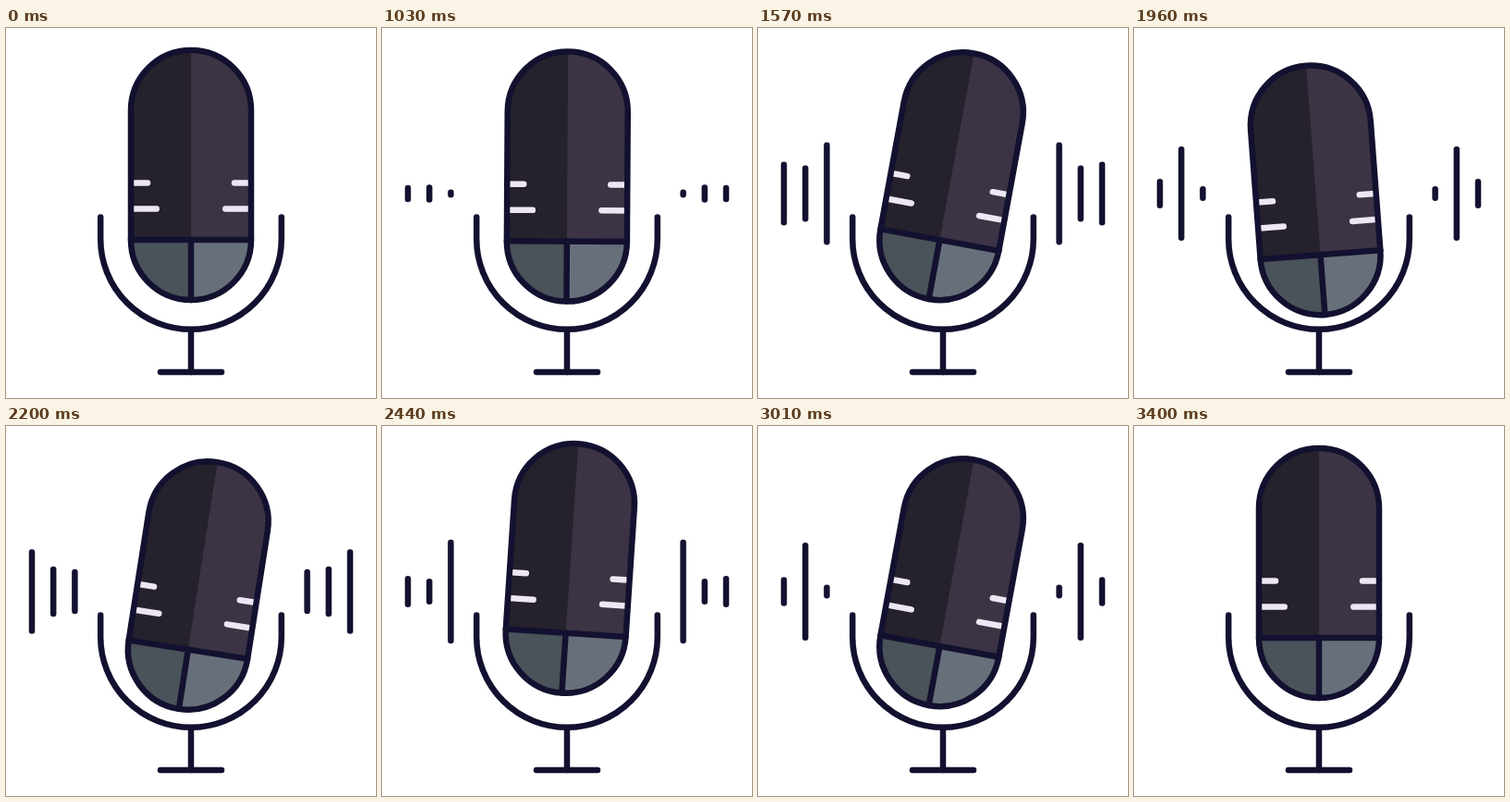
These frames come from a looping animation (400 px wide and 400 px high, 3430 ms). An HTML page with a canvas:

```html
<!DOCTYPE html>
<html lang="en">
<head>
<meta charset="utf-8">
<title>Microphone</title>
<style>
  html, body { margin: 0; width: 100%; height: 100%; overflow: hidden; background: #fff; }
  canvas { display: block; width: 400px; height: 400px; }
</style>
</head>
<body>
<canvas id="stage"></canvas>
<script>
const LOOP = 3430, HOLD = 1000, STEP = 30, STEPS = 80, RAMP = 5;
const INK = '#131130', MARK = '#ece7f2';
const PIVOT = { x: 200, y: 209 };
const RAD = Math.PI / 180;

// Turning points of the vertical bounce: [step, offset].
const BOUNCE = [[0, 0], [1, 1.6], [11, 19], [23.5, -7], [34.5, 19.4], [51.5, -8], [64.5, 10], [STEPS, 0]];

// Each wave swings around its mean; speed is in degrees per step.
const TILT = { mean: 2.8, swing: 7.7, speed: 15, peak: 18.5 };
const BARS = [
  { mean: 55, swing: 30, speed: 20.4, peak: 22.7 },
  { mean: 61, swing: 40, speed: 9.9, peak: 29 },
  { mean: 60, swing: 52, speed: 10.4, peak: 16 }
];

const canvas = document.getElementById('stage');
const ctx = canvas.getContext('2d');
const ratio = window.devicePixelRatio || 1;
canvas.width = canvas.height = 400 * ratio;

function wave({ mean, swing, speed, peak }, step) {
  const fade = Math.min(1, step / RAMP, (STEPS - step) / RAMP);
  return fade * (mean + swing * Math.cos(speed * (step - peak) * RAD));
}

function bounce(step) {
  const next = Math.max(1, BOUNCE.findIndex(([at]) => at >= step));
  const [a, from] = BOUNCE[next - 1], [b, to] = BOUNCE[next];
  const u = (step - a) / (b - a);
  return from + (to - from) * (1 - Math.cos(Math.PI * u)) / 2;
}

function line(x1, y1, x2, y2, color = INK) {
  ctx.strokeStyle = color;
  ctx.beginPath();
  ctx.moveTo(x1, y1);
  ctx.lineTo(x2, y2);
  ctx.stroke();
}

function fillRect(color, x, y, w, h) {
  ctx.fillStyle = color;
  ctx.fillRect(x, y, w, h);
}

function capsule() {
  ctx.beginPath();
  ctx.arc(200, 89, 65, Math.PI, 0);
  ctx.arc(200, 229, 65, 0, Math.PI);
  ctx.closePath();
}

function drawStand() {
  ctx.strokeStyle = INK;
  ctx.beginPath();
  ctx.moveTo(102.2, 204.5);
  ctx.lineTo(102.2, 228);
  ctx.arc(200, 228, 97.8, Math.PI, 0, true);
  ctx.lineTo(297.8, 204.5);
  ctx.stroke();
  line(200, 326, 200, 372);
  line(167, 372, 233, 372);
}

function drawMic(lift, tilt) {
  ctx.save();
  ctx.translate(PIVOT.x, PIVOT.y + lift);
  ctx.rotate(tilt * RAD);
  ctx.translate(-PIVOT.x, -PIVOT.y);

  ctx.save();
  capsule();
  ctx.clip();
  fillRect('#3c3445', 130, 20, 140, 210);
  fillRect('#25212d', 130, 20, 70, 210);
  fillRect('#67707a', 130, 229, 140, 70);
  fillRect('#4a525a', 130, 229, 70, 70);
  for (const [y, end] of [[167.5, 153], [195.5, 162.7]]) {
    line(130, y, end, y, MARK);
    line(270, y, 400 - end, y, MARK);
  }
  ctx.restore();

  line(135, 229, 265, 229);
  line(200, 229, 200, 294);
  capsule();
  ctx.stroke();
  ctx.restore();
}

function drawBars(step) {
  BARS.forEach((bar, i) => {
    const half = wave(bar, step) / 2;
    const x = 28 + 23.2 * i;
    line(x, 179 - half, x, 179 + half);
    line(400 - x, 179 - half, 400 - x, 179 + half);
  });
}

function draw(time) {
  const step = Math.max(0, Math.floor((time % LOOP - HOLD) / STEP));
  ctx.setTransform(ratio, 0, 0, ratio, 0, 0);
  fillRect('#fff', 0, 0, 400, 400);
  ctx.lineWidth = 6.5;
  ctx.lineCap = 'round';
  drawStand();
  drawMic(bounce(step), wave(TILT, step));
  if (step > 0 && step < STEPS) drawBars(step);
}

let start;
function tick(now) {
  start ??= now;
  draw(Math.max(0, now - start));
  requestAnimationFrame(tick);
}
draw(0);
requestAnimationFrame(tick);
</script>
</body>
</html>
```
